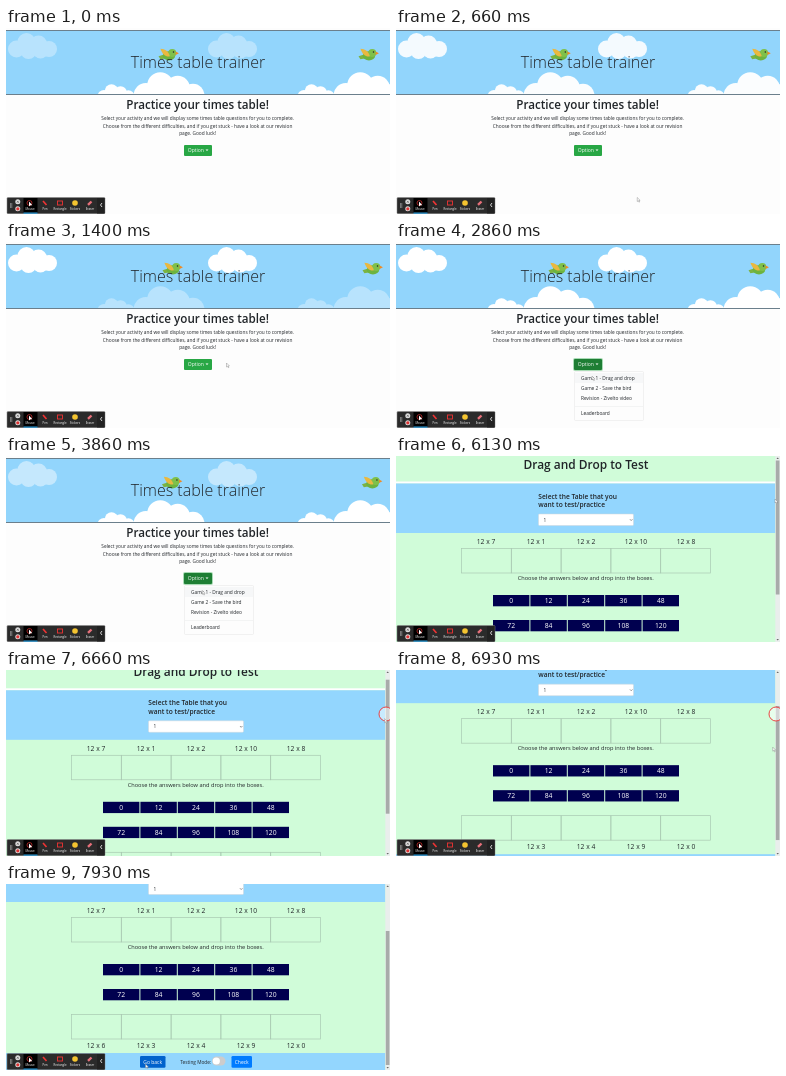
These frames come from a looping animation (384 by 186 pixels, 8000 ms). An HTML page:

```html
<!DOCTYPE html>
<html lang="en">
<head>
<meta charset="utf-8">
<title>Times table trainer</title>
<style>
html, body { margin: 0; width: 100%; height: 100%; overflow: hidden; background: #fff; }
svg { display: block; width: 100vw; height: 100vh; }
text { font-family: "Open Sans", "Noto Sans", sans-serif; fill: #212529; }
.mid { text-anchor: middle; }
.bold { font-weight: 600; }
.white { fill: #fff; }
</style>
</head>
<body>
<svg id="stage" viewBox="0 0 384 186" preserveAspectRatio="none">
  <defs>
    <clipPath id="skyClip"><rect y="2" width="384" height="64"/></clipPath>
    <g id="cloud" fill="#fff">
      <circle cx="-16" cy="3" r="8.500"/><circle cx="-6" cy="-4" r="9"/>
      <circle cx="6" cy="-2" r="8.500"/><circle cx="16.500" cy="3" r="8"/>
      <circle cx="-4" cy="5" r="8"/><circle cx="8" cy="5" r="7.500"/>
    </g>
    <g id="bird">
      <path fill="#7cb342" d="M-10 3l6-2 2 4-6 1z"/>
      <ellipse cx="1" cy="2.500" rx="6.500" ry="4.800" fill="#6db33f"/>
      <circle cx="4.500" cy="-.5" r="4.200" fill="#7fc04a"/>
      <path fill="#f08a24" d="M8-2l3.500 1.800-3.500 1.700z"/>
      <path fill="#e9b840" d="M2 3c-4 1-8-2-10-8 5 0 9 3 10 8z"/>
      <circle cx="5.800" cy="-1.500" r=".8" fill="#222"/>
    </g>
  </defs>

  <g id="home">
    <rect width="384" height="186" fill="#fdfdfd"/>
    <rect y="2" width="384" height="64" fill="#92d5fc"/>
    <g clip-path="url(#skyClip)">
      <g id="high"></g>
      <g id="low"></g>
      <g id="birds"></g>
    </g>
    <rect y="2" width="384" height="1" fill="#6b7f8c"/>
    <rect y="66" width="384" height="1" fill="#6b7f8c"/>
    <text class="mid" x="192" y="40.300" font-size="16.050" font-weight="300">Times table trainer</text>
    <text class="mid bold" x="191.600" y="81" font-size="11.650">Practice your times table!</text>
    <g class="mid" font-size="4.770">
      <text x="191.600" y="92">Select your activity and we will display some times table questions for you to complete.</text>
      <text x="191.600" y="99.500">Choose from the different difficulties, and if you get stuck - have a look at our revision</text>
      <text x="191.600" y="107">page. Good luck!</text>
    </g>
    <rect id="ring" x="177" y="116" width="30" height="13" rx="2" fill="#a9dbb5"/>
    <rect id="option" x="178" y="117" width="28" height="11" rx="1" fill="#28a745"/>
    <text class="white" x="181.800" y="124.200" font-size="5">Option</text>
    <path fill="#fff" d="M199.500 121.500h3l-1.500 1.600z"/>
    <g id="menu">
      <rect x="178.500" y="129.500" width="69" height="49" rx="1" fill="#fdfdfd" stroke="#e9e9e9" stroke-width=".6"/>
      <rect id="hover" x="179" y="131" width="68" height="10" fill="#f6f7f8"/>
      <path stroke="#eceeef" stroke-width=".6" d="M179 164.500H247"/>
      <g font-size="4.800">
        <text x="185" y="138">Game 1 - Drag and drop</text>
        <text x="185" y="148">Game 2 - Save the bird</text>
        <text x="185" y="158">Revision - Zivelto video</text>
        <text x="185" y="173">Leaderboard</text>
      </g>
    </g>
  </g>

  <g id="game">
    <rect width="384" height="186" fill="#d0fcd9"/>
    <g id="doc"></g>
    <rect x="379.300" width="4.700" height="186" fill="#e9eeec"/>
    <path fill="#666" d="M380.500 3l1.200-1.500 1.200 1.500zM380.500 183l1.200 1.500 1.200-1.500z"/>
    <rect id="thumb" x="379.800" y="4.500" width="3.700" height="134" fill="#a8abaa"/>
  </g>

  <g id="bar"></g>
  <circle id="press" r="7" fill="#fff" fill-opacity=".5" stroke="#e33" stroke-width=".9"/>
  <path id="cursor" d="M0 0v4l1-.8.7 1.500.7-.3-.7-1.500h1.200z" fill="#fff" stroke="#777" stroke-width=".4"/>
</svg>
<script>
const LOOP = 8000, TILE = 200;
const $ = id => document.getElementById(id);
const rect = (x, y, w, h, fill, more = "") =>
  `<rect x="${x}" y="${y}" width="${w}" height="${h}" fill="${fill}" ${more}/>`;
const label = (x, y, size, str, more = 'class="mid"') =>
  `<text x="${x}" y="${y}" font-size="${size}" ${more}>${str}</text>`;

function buildSky() {
  const fill = (id, x, y, scale, name = "cloud") => {
    for (const i of [-1, 0, 1]) $(id).innerHTML +=
      `<use href="#${name}" transform="translate(${x + i * TILE} ${y}) scale(${scale})"/>`;
  };
  fill("high", 26.5, 18, 1);
  fill("low", 110, 66, .75);
  fill("low", 163, 63, 1.45);
  fill("birds", 164, 25.5, .95, "bird");
}

function buildGame() {
  let s = label(190, 13, 11.9, "Drag and Drop to Test", 'class="mid bold"');
  s += rect(0, 25.5, 379.3, 2, "#fff") + rect(0, 27.5, 379.3, 49.5, "#93d6fe");
  s += label(142.3, 42.5, 6.65, "Select the Table that you", 'class="bold"');
  s += label(142.3, 51.3, 6.65, "want to test/practice", 'class="bold"');
  s += rect(142.5, 58, 95, 11.5, "#fff", 'rx="1" stroke="#ced4da" stroke-width=".5"');
  s += label(147.5, 65.5, 4.8, "1", "");
  s += '<path fill="none" stroke="#444" stroke-width=".6" d="M234 63.300l1.200 1.200 1.200-1.200"/>';
  const rows = [[88.3, 92.5, [7, 1, 2, 10, 8]], [222.6, 189.5, [6, 3, 4, 9, 0]]];
  for (const [ty, by, nums] of rows) nums.forEach((n, i) => {
    s += label(90 + i * 50, ty, 6.7, "12 x " + n);
    s += rect(65.5 + i * 49.8, by, 49.8, 24.5, "none", 'stroke="#a9c9b2" stroke-width=".7"');
  });
  s += label(189.7, 124, 5.65, "Choose the answers below and drop into the boxes.");
  [0, 12, 24, 36, 48, 72, 84, 96, 108, 120].forEach((n, i) => {
    const x = 97 + i % 5 * 37.4, y = i < 5 ? 139 : 164;
    s += rect(x, y, 36.4, 11.3, "#00004f");
    s += label(x + 18.2, y + 8.1, 6.8, n, 'class="mid white"');
  });
  s += rect(0, 228, 379.3, 18, "#93d6fe");
  s += rect(134, 231, 25.5, 11.8, "#007bff", 'id="back" rx="1.300"');
  s += label(146.7, 238.7, 5, "Go back", 'class="mid white"');
  s += label(174.3, 238.7, 4.75, "Testing Mode:", "");
  s += rect(206, 231.5, 13.5, 9, "#ccc", 'rx="4.500"') + '<circle cx="210.300" cy="236" r="3.600" fill="#fff"/>';
  s += rect(225.5, 231, 20.5, 11.8, "#007bff", 'rx="1.300"');
  s += label(235.7, 238.7, 5, "Check", 'class="mid white"');
  $("doc").innerHTML = s;
}

function buildBar() {
  let s = rect(1, 169.5, 98, 16.2, "#2b2b2b", 'rx="1" stroke="#888" stroke-width=".5"');
  s += rect(17.5, 170, 14, 15, "#000") + rect(17.5, 184.5, 14, 1.2, "#2a9fe0");
  s += rect(91, 170, 7.5, 15.5, "#222");
  s += '<path fill="#999" d="M4 175h.7v5H4zM5.500 175h.7v5h-.7z"/>';
  s += '<circle cx="11.800" cy="173.800" r="2.500" fill="#ddd"/><path stroke="#333" stroke-width=".5" d="M10.800 172.800l2 2m0-2l-2 2"/>';
  s += '<circle cx="11.800" cy="180.800" r="2.500" fill="#ddd"/><circle cx="11.800" cy="180.800" r="1.600" fill="#d33"/>';
  s += '<circle cx="23.500" cy="175" r="2.500" fill="none" stroke="#d33" stroke-width=".7"/><path fill="#fff" d="M23 173.500v5l1.300-1.200h2z"/>';
  s += '<path stroke="#e33" stroke-width="1.700" d="M37 173l3.500 4"/>';
  s += rect(51.5, 173, 5, 4, "none", 'stroke="#e33" stroke-width=".9"');
  s += '<circle cx="69" cy="175" r="2.800" fill="#f4c430"/><path stroke="#e8707a" stroke-width="2.400" d="M82 176.800l3.500-3.300"/>';
  ["Mouse", "Pen", "Rectangle", "Stickers", "Eraser"].forEach((w, i) => {
    s += label(24 + i * 15, 182, 2.9, w, 'class="mid white"');
  });
  s += '<path fill="none" stroke="#fff" stroke-width=".8" d="M96 175l-1.500 2 1.500 2"/>';
  $("bar").innerHTML = s;
}

const ease = u => u * u * (3 - 2 * u);
function track(keys, t) {
  let a = keys[0];
  for (const b of keys) {
    if (t < b[0]) {
      const u = ease((t - a[0]) / (b[0] - a[0]));
      return a.map((v, i) => v + (b[i] - v) * u);
    }
    a = b;
  }
  return a;
}
const POINTER = [[0, 250, 190], [300, 250, 190], [1300, 220.5, 121], [1600, 220.5, 121], [1950, 195, 123],
  [2200, 195, 123], [2700, 196, 134], [5600, 196.5, 135], [6130, 379, 43], [6530, 379, 43],
  [7130, 376, 89], [7330, 376, 89], [7900, 139.5, 180]];
const SCROLL = [[0, 0], [6530, 0], [7130, 59]];
const show = (id, on) => $(id).setAttribute("display", on ? "inline" : "none");
const move = (id, x, y) => $(id).setAttribute("transform", `translate(${x} ${y})`);

// Clouds stay in place and fade out and in, each layer around its own moment.
const FADE = 4000;
function fade(id, t, dip) {
  const d = (t - dip + LOOP) % FADE;
  $(id).setAttribute("opacity", Math.min(1, .35 + Math.min(d, FADE - d) / 1200));
}

function draw(t) {
  const home = t < 4400, open = t >= 2100;
  show("home", home);
  show("game", !home);
  show("menu", open);
  show("ring", open);
  show("hover", t >= 2450);
  $("option").setAttribute("fill", open ? "#1e7e34" : "#28a745");
  fade("high", t, 0);
  fade("low", t, 1400);
  move("birds", -2 * Math.cos(t / 1400 * Math.PI), 0);
  const scroll = track(SCROLL, t)[1];
  move("doc", 0, -scroll);
  move("thumb", 0, scroll * .72);
  $("back").setAttribute("fill", t > 7820 ? "#0062cc" : "#007bff");
  const [, px, py] = track(POINTER, t);
  move("cursor", px, py);
  show("press", t >= 6530 && t < 7330);
  move("press", 380, 44);
}

buildSky();
buildGame();
buildBar();
const start = performance.now();
(function frame() {
  draw((performance.now() - start) % LOOP);
  requestAnimationFrame(frame);
})();
</script>
</body>
</html>
```
